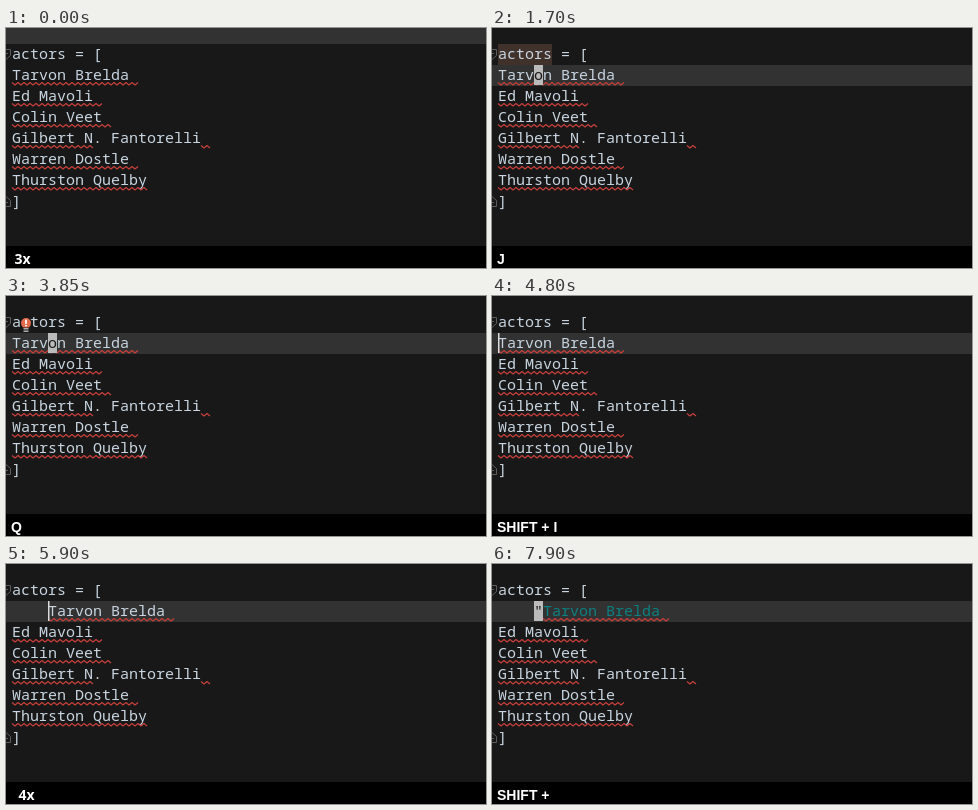
These frames come from a looping animation (480x240 px, 8000 ms). An HTML page:

```html
<!DOCTYPE html>
<html lang="en">
<head>
<meta charset="utf-8">
<title>Editor macro recording</title>
<style>
  html, body { margin: 0; width: 100%; height: 100%; overflow: hidden; background: #181818; }
  svg { display: block; width: 480px; height: 240px; }
  text { white-space: pre; }
  .code { font: 15px "Noto Sans Mono", "DejaVu Sans Mono", monospace; fill: #c8d5e0; }
  .keys { font: bold 14px "Liberation Sans", Arial, sans-serif; fill: #fff; }
  .count { font-family: "Noto Sans", "Open Sans", sans-serif; }
  .wave { fill: none; stroke: #c63f3b; stroke-width: 1.2; stroke-linejoin: round; }
  .fold { fill: #181818; stroke: #5c5c5c; }
</style>
</head>
<body>
<svg id="stage" viewBox="0 0 480 240"></svg>
<script>
const LOOP = 8000, LEFT = 6, CHAR = 9, ROW = 21, CURSOR = 20;
const stage = document.getElementById('stage');

const names = ['Tarvon Brelda', 'Ed Mavoli', 'Colin Veet',
  'Gilbert N. Fantorelli', 'Warren Dostle', 'Thurston Quelby'];

// Underlined column ranges of the rows below the edited one.
const waves = { 2: [[0, 10]], 3: [[0, 11]], 4: [[0, 9], [21, 22]], 5: [[0, 14]], 6: [[0, 15]] };

const start = { row: -1, col: 4, on: false, insert: false, bulb: null, marked: false,
  indent: 0, quote: '', waveFrom: 0, gaps: true, keys: '3x', keysX: 8.5 };

// Each step changes part of the state at its time in ms.
const steps = [
  [750, { row: 0, on: true }],
  [1700, { row: 1, marked: true, keys: 'J', keysX: 5 }],
  [1950, { marked: false }],
  [2300, { bulb: 0 }],
  [2500, { on: false }],
  [2850, { on: true }],
  [3200, { on: false }],
  [3250, { keys: 'Q' }],
  [3450, { on: true, bulb: null }],
  [3850, { bulb: 0 }],
  [4000, { on: false }],
  [4050, { keys: 'A' }],
  [4300, { on: true, bulb: null }],
  [4650, { bulb: 0 }],
  [4700, { keys: 'SHIFT +' }],
  [4800, { keys: 'SHIFT + I', bulb: null, insert: true, col: 0 }],
  [5400, { keys: '', indent: 1, col: 1, waveFrom: 1 }],
  [5550, { keys: '2x', keysX: 12.5, indent: 2, col: 2, waveFrom: 2 }],
  [5750, { keys: '3x', indent: 3, col: 3, waveFrom: 3 }],
  [5900, { keys: '4x', indent: 4, col: 4, waveFrom: 4 }],
  [6500, { bulb: 1 }],
  [6550, { on: false }],
  [6700, { keys: 'SHIFT +', keysX: 5 }],
  [6800, { keys: "SHIFT + '", quote: '"', col: 5, on: true, bulb: null }],
  [7000, { gaps: false, waveFrom: 5 }],
  [7050, { gaps: true }],
  [7400, { bulb: 1 }],
  [7450, { on: false }],
  [7600, { keys: 'ESC', insert: false, col: 4, on: true, bulb: null }],
  [7900, { keys: 'SHIFT +' }],
];

const colX = col => LEFT + CHAR * col;
const rowY = row => 16 + ROW * row;

function add(tag, attrs, text) {
  const el = document.createElementNS('http://www.w3.org/2000/svg', tag);
  for (const key in attrs) el.setAttribute(key, attrs[key]);
  if (text) el.textContent = text;
  stage.append(el);
}

const rect = (x, y, width, height, fill) => add('rect', { x, y, width, height, fill });

function code(text, row, col, fill) {
  add('text', { class: 'code', x: colX(col), y: rowY(row) + 15, ...(fill && { style: `fill:${fill}` }) }, text);
}

function wave(row, from, to) {
  const y = rowY(row) + 17.5, half = 3;
  let d = '';
  for (let i = 0; i * half <= (to - from) * CHAR; i++) {
    d += `${i ? 'L' : 'M'}${colX(from) + i * half} ${y + (i % 2 ? 2.5 : 0)}`;
  }
  add('path', { class: 'wave', d });
}

function bulb(row) {
  const y = rowY(row);
  rect(17.5, y + 16, 5, 1.5, '#a9abad');
  rect(17.5, y + 18.5, 5, 1.5, '#a9abad');
  add('path', { d: `M20 ${y + 6}a5 5 0 0 1 5 5q0 2.8-2.3 4.5h-5.4q-2.3-1.7-2.3-4.5a5 5 0 0 1 5-5z`, fill: '#e46a4c' });
  rect(19.1, y + 7.6, 1.8, 4.2, '#fff');
  rect(19.1, y + 12.8, 1.8, 1.6, '#fff');
}

function draw(s) {
  stage.textContent = '';
  rect(0, 0, 480, 240, '#181818');
  rect(0, rowY(s.row), 480, ROW, '#323232');
  if (s.marked) rect(LEFT, rowY(0), CHAR * 6, ROW, '#40322b');
  add('path', { class: 'fold', d: 'M-1 21.5H4.5V27.5L0 31.5H-1ZM0 25.5H2' });
  add('path', { class: 'fold', d: 'M-1 168.5H0L4.5 172.5V178.5H-1ZM0 174.5H2' });

  const first = ' '.repeat(s.indent) + s.quote + names[0];
  const lines = ['actors = [', first, ...names.slice(1), ']'];
  lines.forEach((line, row) => {
    const lead = line.length - line.trimStart().length;
    code(line.trimStart(), row, lead, row === 1 && s.quote && '#0d8080');
  });

  wave(1, s.waveFrom, first.length + 1);
  for (const row in waves) {
    const gap = lines[row].indexOf(' ');
    for (const [from, to] of waves[row]) {
      if (s.gaps || gap < from) wave(row, from, to);
      else {
        wave(row, from, gap);
        wave(row, gap + 1, to);
      }
    }
  }

  if (s.on && s.insert) rect(colX(s.col), rowY(s.row), 1.5, CURSOR, '#dcdcdc');
  else if (s.on) {
    rect(colX(s.col), rowY(s.row), CHAR, CURSOR, '#bbbbbb');
    code(lines[s.row][s.col], s.row, s.col, '#181818');
  }
  if (s.bulb !== null) bulb(s.bulb);

  rect(0, 218, 480, 22, '#000');
  const counting = /^\d/.test(s.keys);
  add('text', { class: counting ? 'keys count' : 'keys', x: s.keysX, y: 236 }, s.keys);
}

let shown = -1;
function tick() {
  const t = performance.now() % LOOP;
  const past = steps.filter(([at]) => at <= t);
  if (past.length !== shown) {
    shown = past.length;
    draw(Object.assign({}, start, ...past.map(step => step[1])));
  }
  requestAnimationFrame(tick);
}
tick();
</script>
</body>
</html>
```
